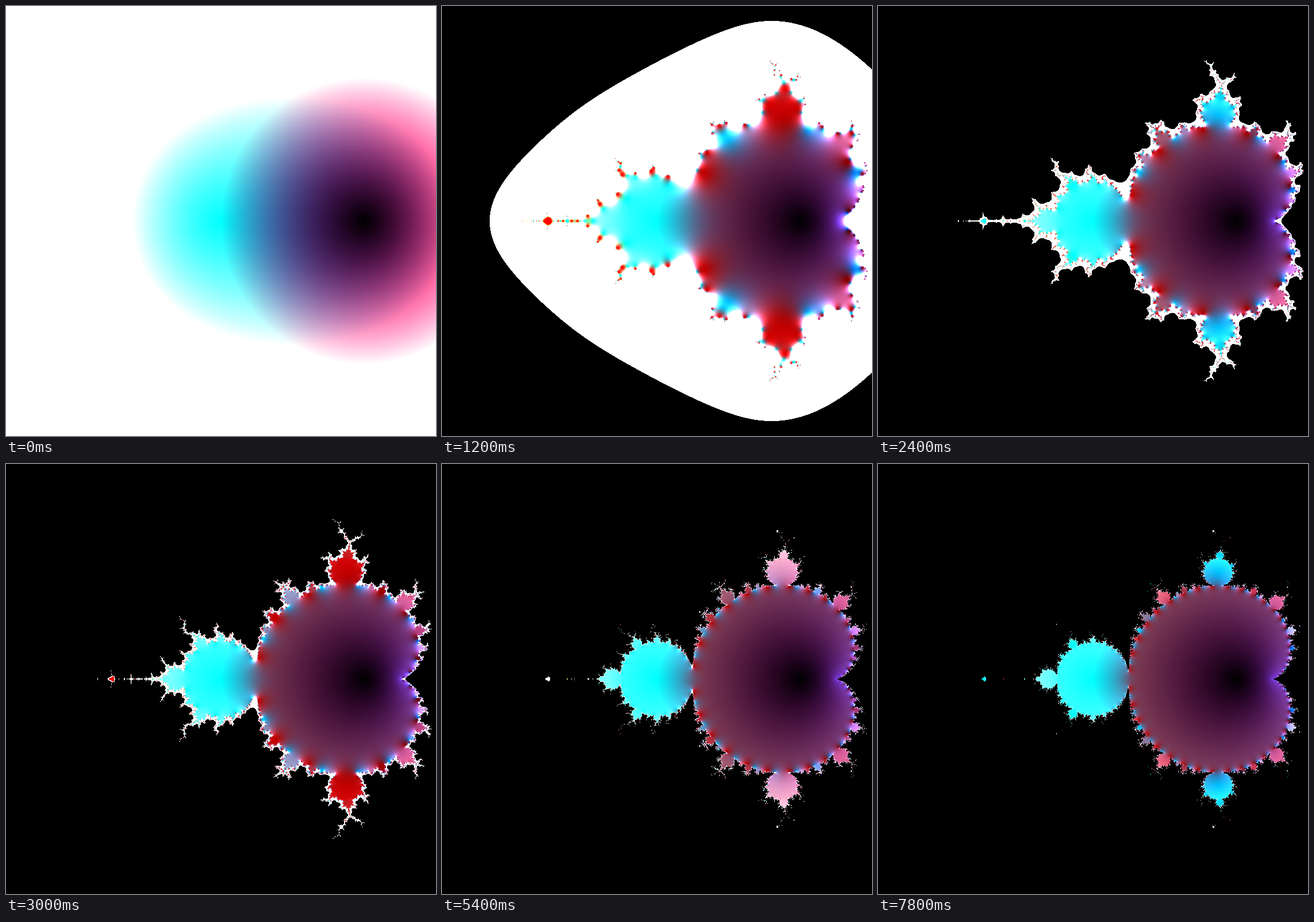
Write an HTML page with a canvas that moves like this. It is 748 by 748 pixels and loops after 8000 ms.

```html
<!DOCTYPE html>
<html lang="en">
<head>
<meta charset="utf-8">
<title>Growing Mandelbrot set</title>
<style>
  html, body { margin: 0; width: 100%; height: 100%; overflow: hidden; background: #000; }
  canvas { display: block; width: 100vw; height: 100vh; }
</style>
</head>
<body>
<canvas id="stage" width="748" height="748"></canvas>
<script>
const SIZE = 748, HALF = SIZE / 2, LOOP = 8000, STEP = 300;
const LIMIT = 1e154; // squared modulus beyond which a point counts as overflowed
const ctx = document.getElementById("stage").getContext("2d");
const image = ctx.createImageData(SIZE, SIZE);
const pixels = image.data;

// Upper half of the plane only; the lower half is its mirror.
const field = () => new Float64Array(SIZE * HALF);
const zRe = field(), zIm = field(); // z -> z² + c
const sRe = field(), sIm = field(); // s -> z (1 + s)
let done = -1;

function paint(i, r, g, b) {
  pixels[i] = 255 * Math.min(1, r);
  pixels[i + 1] = 255 * Math.min(1, g);
  pixels[i + 2] = 255 * Math.min(1, b);
  pixels[i + 3] = 255;
}

function reset() {
  for (const a of [zRe, zIm, sRe, sIm]) a.fill(0);
  done = -1;
}

// Two iterations for every point: red shows the second z,
// green and blue show z² and s after the first.
function advance() {
  const scale = 3 / (SIZE - 1);
  for (let row = 0, k = 0; row < HALF; row++) {
    const ci = 1.5 - row * scale;
    for (let col = 0; col < SIZE; col++, k++) {
      const cr = col * scale - 2.5;
      let x = zRe[k], y = zIm[k], r = 0, g = 0, b = 0;
      if (x * x + y * y < LIMIT) {
        const x1 = x * x - y * y + cr, y1 = 2 * x * y + ci;
        const u = 1 + sRe[k], v = sIm[k];
        const u1 = x1 * u - y1 * v, v1 = x1 * v + y1 * u;
        x = x1 * x1 - y1 * y1 + cr;
        y = 2 * x1 * y1 + ci;
        zRe[k] = x;
        zIm[k] = y;
        sRe[k] = x * (1 + u1) - y * v1;
        sIm[k] = x * v1 + y * (1 + u1);
        const m = x * x + y * y;
        if (m < LIMIT) {
          r = Math.sqrt(m);
          g = x1 * x1 + y1 * y1;
          b = Math.sqrt(u1 * u1 + v1 * v1);
        }
      }
      paint(4 * k, r, g, b);
      paint(4 * ((SIZE - 1 - row) * SIZE + col), r, g, b);
    }
  }
  done++;
}

function draw(now) {
  const step = Math.floor((now % LOOP) / STEP);
  if (step !== done) {
    if (step < done) reset();
    while (done < step) advance();
    ctx.putImageData(image, 0, 0);
  }
}

const start = performance.now();
function tick() {
  draw(performance.now() - start);
  requestAnimationFrame(tick);
}
tick();
</script>
</body>
</html>
```
